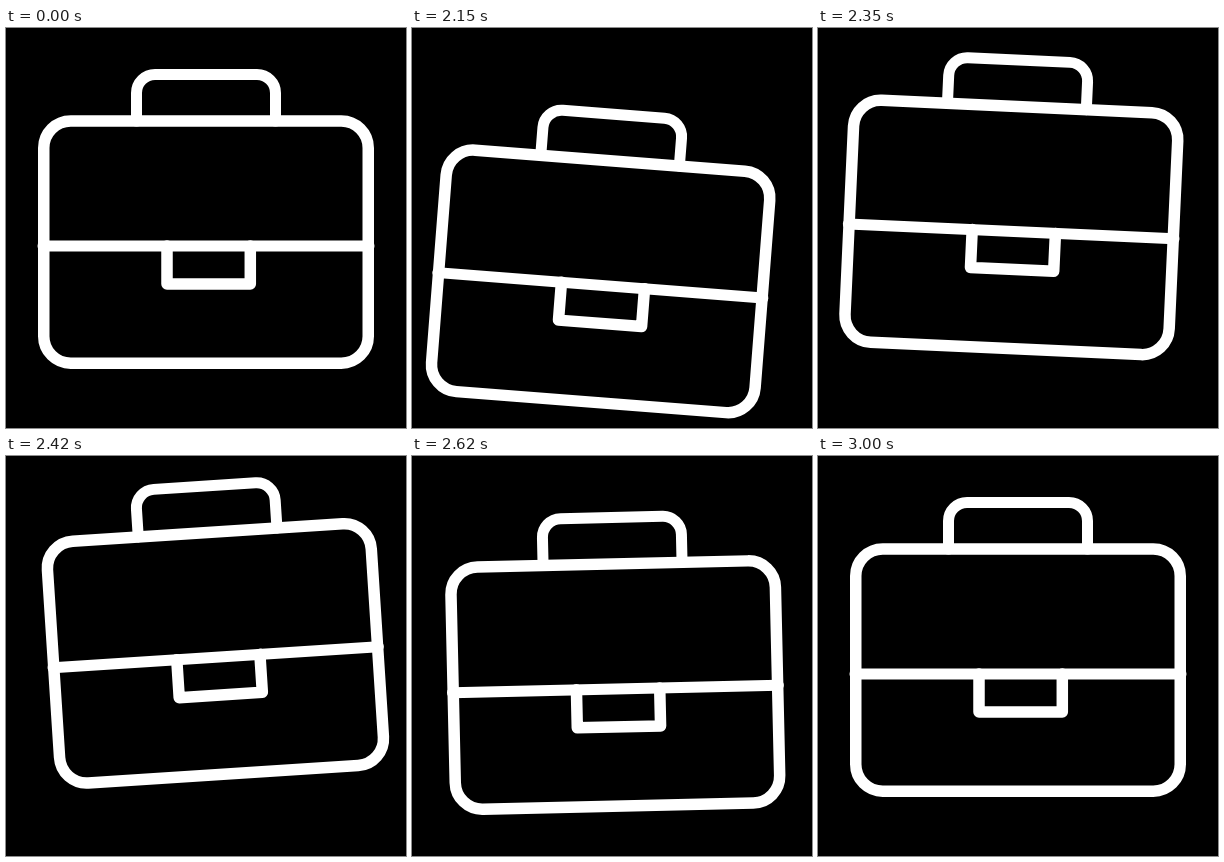
Recreate the animation shown at these times as an HTML page. Size 400x400 px, loop 3.02 s.

```html
<!DOCTYPE html>
<html lang="en">
<head>
<meta charset="utf-8">
<title>Swinging briefcase</title>
<style>
  html, body { margin: 0; width: 100%; height: 100%; overflow: hidden; background: #000; }
  svg { display: block; width: 100vw; height: 100vh; }
</style>
</head>
<body>
<svg viewBox="0 0 400 400">
  <g id="bag" fill="none" stroke="#fff" stroke-width="11.5" stroke-linecap="round" stroke-linejoin="round">
    <rect x="37.75" y="93" width="324.5" height="242.2" rx="27"/>
    <path stroke-width="11" d="M37 218H363"/>
    <path stroke-width="11" d="M130.5 93V65a18.5 18.5 0 0 1 18.5-18.5H251a18.5 18.5 0 0 1 18.5 18.5V93"/>
    <path d="M161 218V256H244.3V218"/>
  </g>
</svg>
<script>
const LOOP = 3020, REST = 2020, STEP = 25;
const bag = document.getElementById('bag');

// Keyframes: [ms into the swing, value]
const tilt = [[0, 0], [255, 7], [506, -7], [752, 5], [1000, 0]];
const drop = [[0, 0], [125, 41], [392, -18], [630, 15], [925, 0], [1000, 0]];

// Sine ease between neighbouring keyframes
function valueAt(keys, ms) {
  const i = keys.findIndex(([time]) => time >= ms);
  if (i < 1) return keys[0][1];
  const [t0, v0] = keys[i - 1], [t1, v1] = keys[i];
  return v0 + (v1 - v0) * (1 - Math.cos(Math.PI * (ms - t0) / (t1 - t0))) / 2;
}

function draw(now) {
  const t = now % LOOP;
  const ms = t < REST ? 0 : Math.min(1000, (Math.floor((t - REST) / STEP) + 1) * STEP);
  bag.setAttribute('transform',
    `translate(0 ${valueAt(drop, ms)}) rotate(${valueAt(tilt, ms)} 200 68)`);
}

const start = performance.now();
function tick() {
  draw(performance.now() - start);
  requestAnimationFrame(tick);
}
tick();
</script>
</body>
</html>
```
